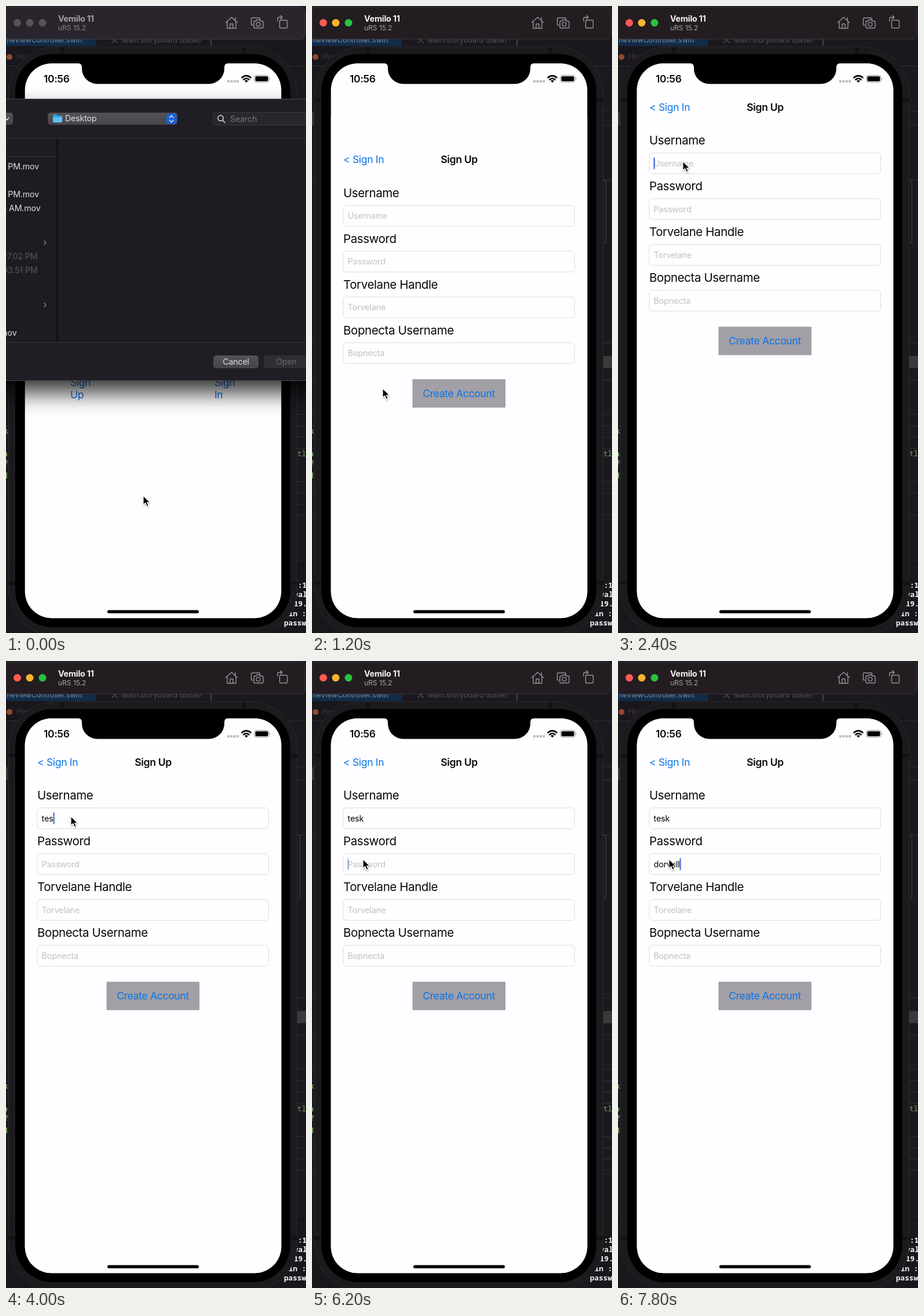
Animation of 518x1082 px, one loop 8000 ms. Source, as an HTML page:

```html
<!DOCTYPE html>
<html lang="en">
<head>
<meta charset="utf-8">
<title>Sign up walkthrough</title>
<style>
  html, body { margin: 0; width: 100%; height: 100%; overflow: hidden; background: #17151a; }
  svg { display: block; width: 100%; height: 100%; font-family: Inter, Roboto, sans-serif; }
  text { white-space: pre; }
  .mono { font: 600 12.7px "Noto Sans Mono", "DejaVu Sans Mono", monospace; }
  .label { font-size: 20.5px; letter-spacing: -.02em; fill: #0a090b; }
  .link { font-size: 17.6px; letter-spacing: -.02em; fill: #0a75e8; }
  .bold { font-weight: 600; fill: #0a090b; }
  .input { font-size: 14.5px; letter-spacing: -.015em; fill: #0a090b; }
  .hint { fill: #c3c1c6; }
  .box { fill: #fefdff; stroke: #dddce0; }
  .mac { font-size: 14.2px; letter-spacing: -.01em; fill: #dededf; }
  .tab { font-size: 12.4px; fill: #565259; }
  .end { text-anchor: end; }
  .mid { text-anchor: middle; }
  .line { fill: none; stroke-linecap: round; stroke-linejoin: round; }

  .idle, .live, #sheet, #pointer { animation: 8s step-end infinite; }
  .idle { animation-name: idle; }
  .live { animation-name: live; }
  #sheet { animation-name: rise; }
  #pointer { animation-name: point; }
  @keyframes idle { 0% { visibility: visible } 2.5%, 100% { visibility: hidden } }
  @keyframes live { 0% { visibility: hidden } 2.5%, 100% { visibility: visible } }
  @keyframes rise {
    0% { transform: translateY(957px) }
    15% { transform: translateY(90.5px) }
    17.5% { transform: translateY(8.5px) }
    20%, 100% { transform: none }
  }
  @keyframes point {
    0% { transform: translate(237px, 845px) }
    5% { transform: translate(226px, 822px) }
    7.5% { transform: translate(168px, 725px) }
    10% { transform: translate(126px, 669px) }
    12.5% { transform: translate(122px, 660px) }
    20% { transform: translate(120px, 600px) }
    22.5% { transform: translate(115px, 420px) }
    25% { transform: translate(113px, 295px) }
    27.5% { transform: translate(112px, 268px) }
    55% { transform: translate(118px, 330px) }
    57.5% { transform: translate(106px, 375px) }
    60% { transform: translate(88px, 370px) }
    62.5% { transform: translate(86px, 352px) }
    65%, 100% { transform: translate(88px, 342px) }
  }
</style>
</head>
<body>
<svg viewBox="0 0 518 1082" preserveAspectRatio="none">
  <defs>
    <clipPath id="screen"><rect x="32.700" y="99" width="442.600" height="957.300" rx="46"/></clipPath>
    <filter id="soft" x="-20%" y="-20%" width="140%" height="140%"><feGaussianBlur stdDeviation="19"/></filter>
    <filter id="drop" x="-50%" y="-50%" width="200%" height="200%">
      <feDropShadow dx="0" dy="1.5" stdDeviation="1.2" flood-opacity=".35"/>
    </filter>
    <linearGradient id="knob" x2="0" y2="1">
      <stop stop-color="#545257"/><stop offset="1" stop-color="#47454a"/>
    </linearGradient>
  </defs>

  <!-- editor behind the phone -->
  <rect width="518" height="1082" fill="#1b191f"/>
  <rect y="57" width="155" height="12" fill="#102c49"/>
  <rect y="70" width="518" height="33" fill="#1a171c"/>
  <text class="tab end" x="132" y="62.500" style="fill:#838b96">HomeViewController.swift</text>
  <text class="tab" x="200" y="62.500">Main.storyboard (Base)</text>
  <text class="tab" x="18" y="92" opacity=".6">Home</text>
  <path class="line" d="M183 55l9 8M192 55l-9 8M354 57v11" stroke="#565259" stroke-width="1.500"/>
  <circle cx="6" cy="88" r="5" fill="#8f4a2b"/>
  <path d="M0 103.5H518M0 182.5H518M0 205.5H518M0 300.5H518M0 581.5H518M0 645.5H518M0 704.5H518M0 724.5H518M0 743.5H518M0 763.5H518M0 820.5H518M0 840.5H518M0 859.5H518M0 878.5H518" stroke="#302d34"/>
  <path d="M503 301h4.500v108H503" fill="none" stroke="#45424a"/>
  <path d="M503 604h15v21H503zM0 184h3v21H0z" fill="#3b393e"/>
  <g class="mono" fill="#6fa555">
    <text x="-4" y="738">k</text>
    <text x="-5" y="777">n</text>
    <text x="-4" y="794">f</text>
    <text x="-5" y="815">d</text>
    <text x="503" y="777" font-weight="400">tl</text>
  </g>
  <path d="M0 963H518V1082H0z" fill="#19171b"/>
  <path d="M0 963.500H518" stroke="#09080a"/>
  <g class="mono" fill="#f4f3f5">
    <text x="504" y="1004">:1</text>
    <text x="497" y="1020">val</text>
    <text x="497" y="1036">19.</text>
    <text x="488" y="1053">in :</text>
    <text x="480" y="1069">passw</text>
  </g>

  <!-- phone -->
  <rect x="4.500" y="70.500" width="498" height="1016" rx="80" fill="#1d1a1e" stroke="#2b282d"/>
  <path d="M93 71h7v12h-7zM408 71h7v12h-7zM4 160h12v6H4zM491 160h12v6h-12zM4 993h12v6H4zM491 993h12v6h-12z" fill="#141215"/>
  <rect x="16" y="83" width="475" height="989" rx="64"/>
  <g clip-path="url(#screen)">
    <rect x="32" y="99" width="444" height="958" fill="#fefdff"/>
    <text class="mid" x="254" y="401" font-size="62" font-weight="700" letter-spacing="-1.2">Fildo</text>
    <text class="mid label" x="254" y="474" style="font-size:27px">Sign In</text>
    <text class="label" x="91.500" y="500">Username</text>
    <rect class="box" x="91.500" y="513.500" width="325" height="36.500" rx="5.500"/>
    <text class="label" x="91.500" y="585.500">Password</text>
    <rect class="box" x="91.500" y="599.500" width="325" height="36" rx="5.500"/>
    <g class="link">
      <text x="111" y="656">Sign</text><text x="111" y="677">Up</text>
      <text x="360" y="656">Sign</text><text x="360" y="677">In</text>
    </g>

    <g id="sheet">
      <rect x="32" y="99" width="444" height="958" fill="#fefdff"/>
      <text class="link" x="54" y="180.500">&lt; Sign In</text>
      <text class="link bold mid" x="254" y="180.500" style="fill:#0a090b">Sign Up</text>
      <g id="form"></g>
      <rect x="173.500" y="553.500" width="160.500" height="49" fill="#a29fa6"/>
      <text class="link mid" x="253.500" y="584">Create Account</text>
      <rect id="caret" width="2" height="20" fill="#2f5fd6"/>
    </g>
  </g>
  <path d="M125 98v1q6 0 6 7v2a27 26.500 0 0 0 27 26.500H350a27 26.500 0 0 0 27-26.500v-2q0-7 6-7v-1z"/>
  <text class="bold" x="65" y="132" font-size="17.500" letter-spacing="-.4">10:56</text>
  <path d="M382 130H402" stroke="#bdbbc0" stroke-width="4" stroke-dasharray="4 1.400"/>
  <path class="line" d="M407.500 123.500a10.500 10.500 0 0 1 15 0M410.500 127a6.200 6.200 0 0 1 9 0" stroke="#000" stroke-width="2.600"/>
  <path d="M415 132.200l-2.800-3a4 4 0 0 1 5.600 0z"/>
  <rect x="428.800" y="119.600" width="25.400" height="12" rx="3.600" fill="none" stroke="#98969b"/>
  <rect x="430.500" y="121.300" width="22" height="8.600" rx="2"/>
  <path d="M455.500 123.500q2 2 0 4z" fill="#98969b"/>
  <rect x="175" y="1042.500" width="158" height="5.500" rx="2.700"/>

  <!-- simulator title bar -->
  <path d="M0 2H508q8 0 8 8V49q0 8-8 8H0z" fill="#231c21" stroke="#3b353a"/>
  <path class="idle" d="M0 2H508q8 0 8 8V49q0 8-8 8H0z" fill="#2a252d" stroke="#3b373e"/>
  <g class="live">
    <circle cx="19.500" cy="29" r="6.500" fill="#fc5b57"/>
    <circle cx="41" cy="29" r="6.500" fill="#fdb42c"/>
    <circle cx="63" cy="29" r="6.500" fill="#27c23f"/>
    <text x="90" y="27" font-size="14.300" font-weight="700" letter-spacing="-.2" fill="#f4f2f4">Vemilo 11</text>
    <text x="90" y="42" font-size="12" fill="#a9a4a8">uRS 15.2</text>
  </g>
  <g class="idle">
    <g fill="#57535a">
      <circle cx="19.500" cy="29" r="6.500"/><circle cx="41" cy="29" r="6.500"/><circle cx="63" cy="29" r="6.500"/>
    </g>
    <text x="90" y="27" font-size="14.300" font-weight="700" letter-spacing="-.2" fill="#a5a1a7">Vemilo 11</text>
    <text x="90" y="42" font-size="12" fill="#88848a">uRS 15.2</text>
  </g>
  <g class="line" stroke="#99949a" stroke-width="1.400">
    <path d="M379.500 28.500l10-9 10 9M382 27v11.500h15V27M396 20v5M387 38v-7h5v7"/>
    <path d="M426 33h-1.500q-1 0-1-1V22q0-1.500 1.500-1.500h12q1.500 0 1.500 1.500v2"/>
    <path d="M428.500 26h3l1.500-2h5l1.500 2h3q1.500 0 1.500 1.500v9q0 1.500-1.500 1.500h-13q-1.500 0-1.500-1.500v-9q0-1.500 1.500-1.500z"/>
    <circle cx="435.500" cy="31.500" r="3.400"/>
    <rect x="472.500" y="24.500" width="13" height="13.500" rx="1.500"/>
    <path d="M469 26v-4q0-2.500 2.500-2.500h5M474 16.500l3 3-3 3"/>
  </g>

  <!-- open panel -->
  <g class="idle">
    <rect x="-150" y="181" width="818" height="486" rx="8" filter="url(#soft)" opacity=".8"/>
    <rect x="-150" y="160.500" width="818" height="486" rx="8" fill="#201e24" stroke="#4b494f"/>
    <path d="M0 229H518V580H0z" fill="#1e1c22"/>
    <path d="M0 229H518M0 580.500H518" stroke="#38363b"/>
    <path d="M0 259.500H88" stroke="#38363b"/>
    <path d="M88.500 229V580" stroke="#050506" stroke-width="1.500"/>
    <rect x="-20" y="184" width="32" height="21" rx="5" fill="url(#knob)"/>
    <rect x="72" y="184" width="224" height="21" rx="5" fill="url(#knob)"/>
    <path d="M81 189q0-2 2-2h4l2 2h6q2 0 2 2v8q0 2-2 2H83q-2 0-2-2z" fill="#2f9fe0"/>
    <path d="M81 192h16v7q0 2-2 2H83q-2 0-2-2z" fill="#5cc0f4"/>
    <rect x="277" y="185.500" width="17.500" height="18" rx="4" fill="#1763d8"/>
    <rect x="357.500" y="183.500" width="180" height="22" rx="5" fill="#29272d" stroke="#3b393f"/>
    <rect x="358" y="603" width="78" height="22" rx="5" fill="url(#knob)"/>
    <rect x="445" y="603" width="78" height="22" rx="5" fill="#302e34"/>
    <g class="line" stroke="#e6e6e8" stroke-width="1.500">
      <path d="M282.500 192.500l3.200-3.500 3.200 3.500M282.500 197l3.200 3.500 3.200-3.500M-2 193l3.500 3.500 3.500-3.500"/>
      <circle cx="370.500" cy="193.500" r="4.700"/><path d="M374 197.200l4 4"/>
      <path d="M66 405l3 3.500-3 3.500M66 512.500l3 3.500-3 3.500" stroke="#8a888d" stroke-width="1.200"/>
    </g>
    <g class="mac">
      <text x="102" y="199">Desktop</text>
      <text x="387" y="199.500" style="fill:#77757b">Search</text>
      <text class="mid" x="397" y="619">Cancel</text>
      <text class="mid" x="484" y="619" style="fill:#69676d">Open</text>
      <g class="end">
        <text x="57" y="282">4 PM.mov</text>
        <text x="57" y="330">1 PM.mov</text>
        <text x="59.500" y="354">8 AM.mov</text>
        <text x="18.500" y="569">PM.mov</text>
        <g style="fill:#59575d"><text x="54.500" y="437">27.02 PM</text><text x="54.500" y="461">03.51 PM</text></g>
      </g>
    </g>
  </g>

  <g id="pointer">
    <path d="M0 0V16l3.700-3.400 2.700 6 2.900-1.300-2.600-5.800h5z" stroke="#fff" stroke-width="1.200" filter="url(#drop)"/>
  </g>
</svg>
<script>
  const rows = [
    ["Username", "Username"],
    ["Password", "Password"],
    ["Torvelane Handle", "Torvelane"],
    ["Bopnecta Username", "Bopnecta"]
  ];
  const form = document.getElementById("form");
  const caret = document.getElementById("caret");
  const pitch = 79;

  form.innerHTML = rows.map(([label, hint], i) => `
    <g transform="translate(0 ${i * pitch})">
      <text class="label" x="54" y="239">${label}</text>
      <rect class="box" x="54" y="253.500" width="399.500" height="36" rx="5.500"/>
      <text class="input hint" x="61.500" y="276.500">${hint}</text>
    </g>`).join("");
  const inputs = form.querySelectorAll(".input");

  // focus: when the caret enters; from: first key; head: letters in the first step
  const entries = [
    { word: "tesk", focus: 2400, from: 3800, head: 2 },
    { word: "dorvell", focus: 5200, from: 6600, head: 1 }
  ];
  const step = 200;

  function typed({ word, from, head }, t) {
    return t < from ? "" : word.slice(0, head + (t - from) / step);
  }

  function blink(t) {
    const wave = Math.cos(2 * Math.PI * (t / 1000 - 0.45));
    return Math.min(1, Math.max(0, 0.5 + 1.6 * wave));
  }

  function draw(now) {
    const t = Math.floor((now % 8000) / step) * step;
    caret.setAttribute("opacity", 0);
    entries.forEach((entry, i) => {
      const value = typed(entry, t);
      const input = inputs[i];
      input.textContent = value || rows[i][1];
      input.classList.toggle("hint", !value);
      const next = entries[i + 1];
      if (t < entry.focus || (next && t >= next.focus)) return;
      const keysEnd = entry.from + (entry.word.length - entry.head) * step;
      const typing = t >= entry.from && t <= keysEnd + step;
      caret.setAttribute("x", 61.5 + (value ? input.getComputedTextLength() : 0));
      caret.setAttribute("y", 261.5 + i * pitch);
      caret.setAttribute("opacity", typing ? 1 : blink(t));
    });
  }

  let start;
  function tick(now) {
    start ??= now;
    draw(now - start);
    requestAnimationFrame(tick);
  }
  draw(0);
  requestAnimationFrame(tick);
</script>
</body>
</html>
```
